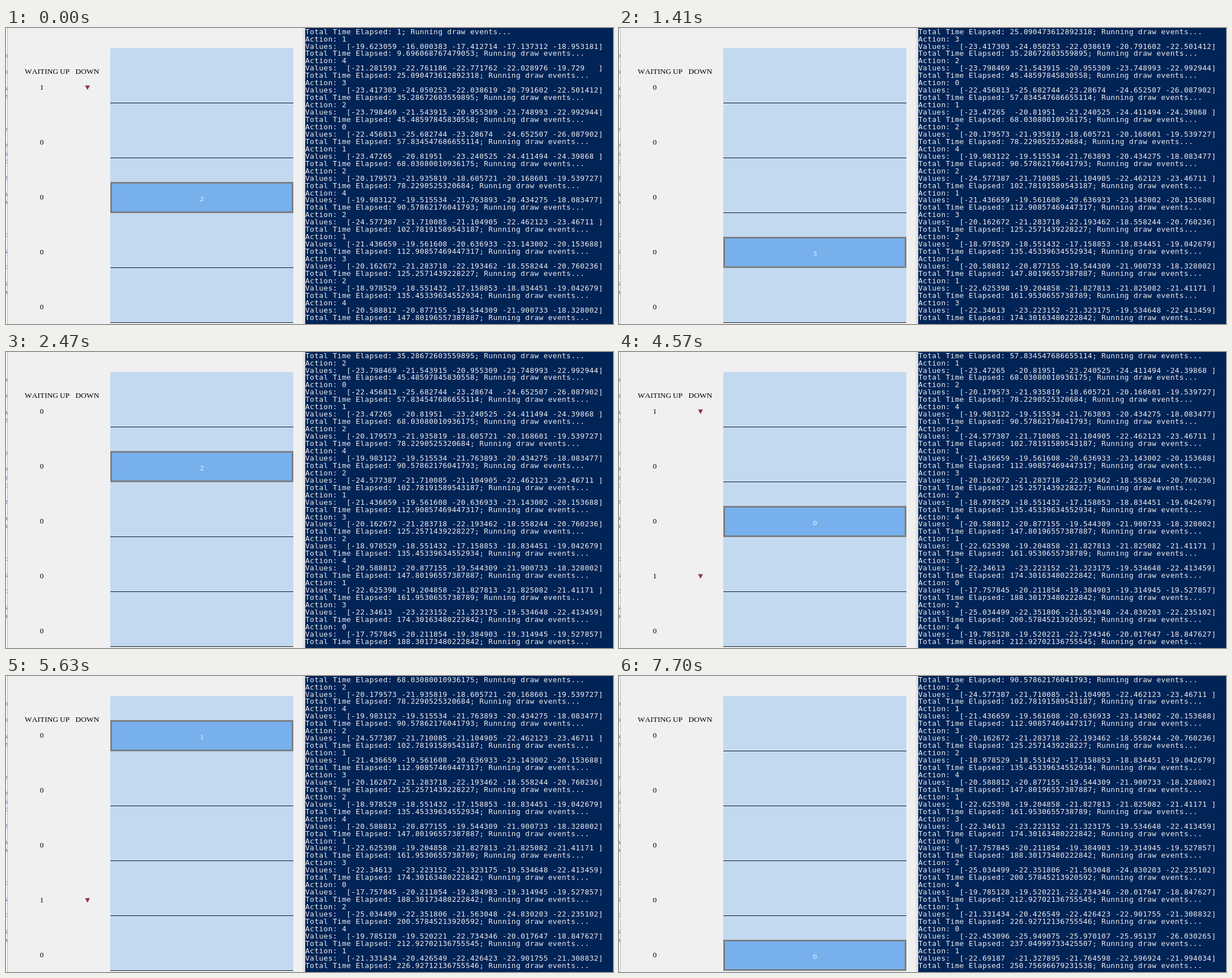
An HTML page that plays this animation: 1071x523 px, repeating every 8000 ms.

```html
<!DOCTYPE html>
<html lang="en">
<head>
<meta charset="utf-8">
<title>Elevator simulation</title>
<style>
  html, body { margin: 0; width: 100%; height: 100%; overflow: hidden; background: #f0f0f0; }
  svg { display: block; }
  .ui { font: 13.5px "Liberation Serif", "Times New Roman", serif; font-kerning: none; }
  .mid { text-anchor: middle; }
  .log text { font: 12.8px "DejaVu Sans Mono", monospace; letter-spacing: .38px; fill: #eeedf0; white-space: pre; }
  .edge { font: 11px "DejaVu Sans", sans-serif; text-anchor: end; }
</style>
</head>
<body>
<svg width="1071" height="523" viewBox="0 0 1071 523">
  <defs>
    <linearGradient id="shade"><stop stop-color="#f0f0f0"/><stop offset="1" stop-color="#d4d6da"/></linearGradient>
    <clipPath id="sliver"><rect width="2" height="523"/></clipPath>
  </defs>
  <rect width="1071" height="523" fill="#f0f0f0"/>
  <rect width="2" height="523" fill="#fff"/>
  <g id="edge" class="edge" clip-path="url(#sliver)"></g>
  <rect x="2" width="1" height="523" fill="#b4b4b4"/>
  <rect x="522" width="6" height="523" fill="url(#shade)"/>
  <rect x="528" width="543" height="523" fill="#012456"/>
  <rect x="184" y="35.5" width="323" height="484.5" fill="#c3d9f0"/>
  <g class="ui">
    <text x="33" y="81">WAITING</text>
    <text x="95" y="81">UP</text>
    <text x="122.5" y="81">DOWN</text>
  </g>
  <g id="floors" class="ui mid"></g>
  <g id="car" class="ui mid">
    <rect x="185.5" y="79.5" width="320" height="52" fill="#77b0ec" stroke="#7c7f84" stroke-width="3"/>
    <text id="riders" x="345.5" y="112" fill="#f4f8fc"></text>
  </g>
  <g id="console" class="log"></g>
</svg>
<script>
const LOOP = 8000, STEP = 1050, LEAD = 700, ROWS = 40, ROW_H = 12.95, FLOOR_H = 97, FIRST = 12;
const ACTIONS = "143201242132413024101";  // the floor chosen at each entry
const RIDERS = "233210120";
const WAITING = { 0: [0], 5: [0, 3], 6: [3] };  // rows with one caller going down
const CLOCKS = `9.696068767479053 25.090473612892318 35.28672603559895 45.48597845830558
  57.834547686655114 68.03080010936175 78.2290525320684 90.57862176041793 102.78191589543187
  112.90857469447317 125.2571439228227 135.45339634552934 147.80196557387887 161.9530655738789
  174.30163480222842 188.30173480222842 200.57845213920592 212.92702136755545 226.92712136755546
  237.04999733425507 250.75696679231538`.split(/\s+/);

const $ = id => document.getElementById(id);
function add(parent, tag, attrs, text = "") {
  const el = document.createElementNS("http://www.w3.org/2000/svg", tag);
  for (const key in attrs) el.setAttribute(key, attrs[key]);
  el.textContent = text;
  return parent.appendChild(el);
}

let seed = 7;
const random = () => (seed = seed * 16807 % 2147483647) / 2147483647;

// five estimates around a common level, the chosen action being the best
function estimates(action) {
  const level = 16 + 7 * random();
  const values = Array.from({ length: 5 }, (_, i) =>
    -level - (i == action ? 0 : 0.4 + 3.5 * random()));
  return values.map(v => String(+v.toFixed(6)).padEnd(10)).join(" ");
}

const clock = t => `Total Time Elapsed: ${t}; Running draw events...`;
const lines = [clock(1), ...[...ACTIONS].flatMap((action, i) => [
  `Action: ${action}`,
  `Values:  [${estimates(action)}]`,
  clock(CLOCKS[i])
])];

// slivers of the window behind
for (let y = 52; y < 520; y += 14.4)
  if (random() < 0.6)
    add($("edge"), "text", { x: 2.8, y, fill: random() < 0.25 ? "#3a7ab8" : "#777" }, "ensca"[Math.floor(5 * random())]);

const floors = [0, 1, 2, 3, 4].map(i => {
  const y = i * FLOOR_H;
  add($("floors"), "rect", { x: 184, y: 132 + y, width: 323, height: 1, fill: "#0c1420" });
  return {
    count: add($("floors"), "text", { x: 63, y: 109 + y }),
    down: add($("floors"), "path", { d: `M139.5 ${101.5 + y}h8.5l-4.25 8z`, fill: "#8b3446" })
  };
});
const rows = Array.from({ length: ROWS }, (_, i) =>
  add($("console"), "text", { x: 528, y: Math.round(10.6 + i * ROW_H) }));

function draw(step) {
  const calls = WAITING[step] || [];
  floors.forEach(({ count, down }, i) => {
    const called = calls.includes(i);
    count.textContent = +called;
    down.setAttribute("visibility", called ? "visible" : "hidden");
  });
  // the car has reached the floor chosen one entry earlier
  const floor = ACTIONS[FIRST + step - 1];
  $("car").setAttribute("transform", `translate(0 ${(4 - floor) * FLOOR_H})`);
  $("riders").textContent = RIDERS[step];
  rows.forEach((row, i) => row.textContent = lines[3 * step + i]);
}

let shown = -1;
const origin = performance.now();
function tick() {
  const t = (performance.now() - origin) % LOOP;
  const step = Math.floor((t + LEAD) / STEP);
  if (step !== shown) draw(shown = step);
  requestAnimationFrame(tick);
}
tick();
</script>
</body>
</html>
```
